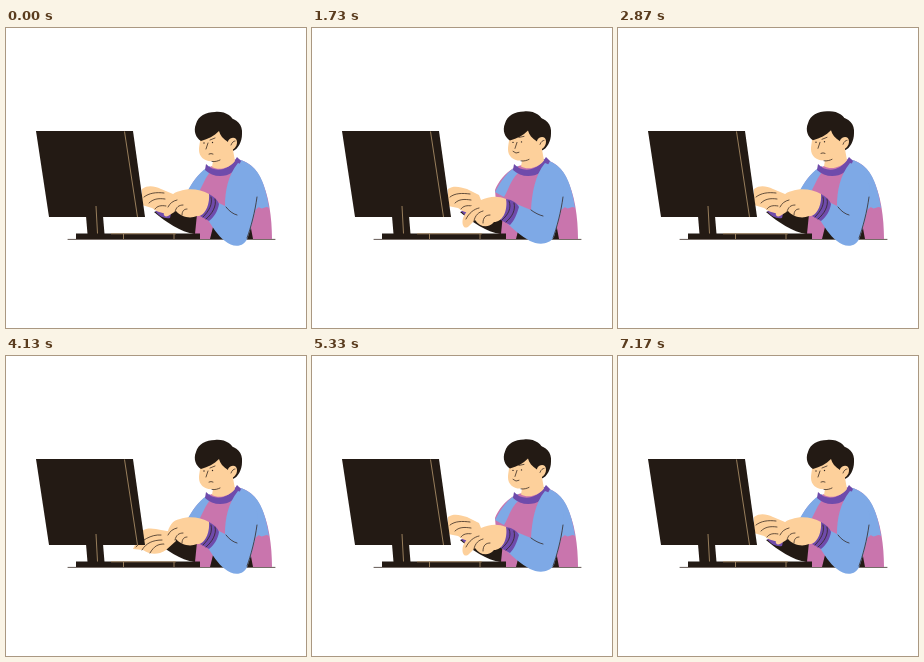
An HTML page for the animation above (7.21 s loop, 300x300 px).

```html
<!DOCTYPE html>
<html lang="en">
<head>
<meta charset="utf-8">
<title>Typing at the desk</title>
<style>
html, body { margin: 0; width: 100%; height: 100%; overflow: hidden; background: #fff; }
svg { display: block; width: 100%; height: 100%; }
.ink { fill: none; stroke: #30231d; stroke-width: .75; stroke-linecap: round; stroke-linejoin: round; }
.trim { fill: none; stroke: #a58a64; stroke-width: .9; }
.skin { fill: #fdd09b; }
.dark { fill: #231a14; }
.blue { fill: #7ea9e6; }
.pink { fill: #c975ad; }
.violet { fill: #6f4bab; }
</style>
</head>
<body>
<svg viewBox="0 0 300 300">
  <path class="ink" d="M62 211.4H269"/>
  <g id="body"></g>
  <path class="dark" d="M70 205.5H194V211H70Z"/>
  <path class="trim" d="M105 205.8H170M117.5 206V211M168 206V211"/>
  <g id="far"></g>
  <g id="head">
    <path class="dark" d="M221 90C231 90 237 97 236 106C236 114 232 121 227 123L219 112Z"/>
    <path class="skin" d="M194 105C195 112 193 117 193 122C193 129 199 134 207 133L206 139C213 143 224 140 229 133L227 122L226 104L204 98Z"/>
    <path class="dark" d="M195 113C190 110 187 103 190 96C192 88 200 84 209 84C219 83 227 88 229 96L229 109L222 114C217 111 214 107 213 103C208 108 202 111 195 113Z"/>
    <path class="skin" d="M222 113C225 108 231 109 231 114C231 119 227 123 223 122Z"/>
    <path class="ink" d="M225 117C226 114 228 113 229 113M206 133.5C209 134 212 133 214 132M202 115L200 121"/>
    <circle cx="198" cy="115" r=".7" fill="#30231d"/>
    <circle cx="206.5" cy="114.5" r=".7" fill="#30231d"/>
    <path class="ink" id="brow"/>
    <path class="ink" id="mouth"/>
  </g>
  <g id="near"></g>
  <g id="monitor">
    <path class="dark" d="M80 188H97L98.5 206H81.5Z"/>
    <path class="dark" d="M30 103H127L139 189H43Z"/>
    <path class="trim" d="M118.5 103.5L131.5 189M90 178L91.5 205.5"/>
  </g>
</svg>
<script>
const LOOP = 7210, CYCLE = LOOP / 2;
const byId = id => document.getElementById(id);

// [layer, class, resting, right hand pressing, left hand pressing]
const parts = [
  ["body", "pink", "M203 139C193 145 186 154 183 162L187 211H266C266 190 263 166 254 149C249 139 241 133 231 131Z"],
  ["body", "blue", "M231 131C246 134 254 145 258 158C261 167 262 174 263 180C259 177 257 183 253 179C250 181 248 184 245 182L226 160Z"],
  ["body", "blue", "M204 138C195 142 188 152 182 162L191 166C195 163 197 153 204 144Z",
                   "M206 138C196 142 189 153 183 164L192 169C196 163 198 153 206 145Z"],
  ["body", "dark", "M204 211L207 199L219 211ZM239 211L244 195L247 211Z"],
  ["body", "violet", "M200 136C207 144 222 145 231 129L235 133C229 150 209 152 199 142Z",
                     "M202 136C209 144 224 145 234 129L238 133C231 150 211 152 201 142Z"],
  ["far", "dark", "M148 184L164 180L191 186L189 206C174 204 160 194 148 184Z"],
  ["far", "violet", "M149 183L166 181L164 190C158 191 153 188 149 183Z"],
  ["far", "skin", "M136 161C142 157 148 158 155 161L167 166L172 176L164 184C157 187 150 183 146 180L136 177Z",
                  "M136 161C142 157 148 159 155 161L167 167L171 177L164 184C157 187 150 183 146 180L136 178Z",
                  "M136 175C142 171 149 173 155 174L167 176L170 185L160 194C151 200 143 198 137 194L127 193Z"],
  ["far", "ink", "M138 169C143 165 150 164 158 165M143 175C147 171 152 170 159 171M149 181C151 178 155 177 160 178",
                 "M138 169C143 165 150 165 158 166M143 175C147 171 152 171 159 172M149 181C151 178 155 177 160 178",
                 "M130 191C135 185 145 178 155 179M136 194C140 187 147 184 156 184M144 197C148 190 152 188 158 188"],
  ["near", "blue", "M232 135C246 139 253 155 252 167C250 183 246 197 242 209C238 220 227 220 219 213C211 207 207 199 202 192L209 173L219 178C219 163 222 147 232 135Z",
                   "M233 135C247 139 253 155 252 166C250 182 246 196 242 209C237 217 226 217 218 213C209 208 201 201 195 195L202 175L219 182C220 165 223 147 233 135Z"],
  ["near", "ink", "M251 169C249 184 245 199 241 210M220 179C223 183 227 186 231 187",
                  "M251 169C249 184 245 199 241 210M219 182C223 185 227 187 231 188"],
  ["near", "violet", "M203 166C209 169 212 173 213 176C212 183 208 189 203 193L194 188C200 181 203 175 203 166Z",
                     "M194 171C201 172 205 175 207 179C205 186 202 193 198 197L187 191C193 185 195 179 194 171Z"],
  ["near", "skin", "M203 166C195 161 182 160 174 163C166 164 163 171 161 178C156 184 157 190 162 188L170 183C175 189 184 191 191 188C198 189 204 178 203 166Z",
                   "M194 171C185 167 176 169 169 172C159 176 155 182 151 190C149 198 153 202 157 198L163 192C168 199 176 201 182 194C190 194 196 184 194 171Z"],
  ["near", "ink", "M162 179C164 175 167 173 171 172M169 184C170 179 173 177 177 177M176 187C176 183 178 181 181 181",
                  "M154 191C157 185 162 181 167 180M162 193C163 187 167 184 171 183M171 195C171 189 174 187 178 187"],
  ["near", "ink", "M205 169C207 176 203 183 197 189M209 171C211 178 206 186 200 191",
                  "M197 173C200 180 196 187 190 192M202 175C204 182 200 189 194 194"]
];

const numbers = /-?\d+(\.\d+)?/g;
function blend(a, b, t) {
  if (!t || a === b) return a;
  const end = b.match(numbers);
  let i = 0;
  return a.replace(numbers, n => (+n + (end[i++] - n) * t).toFixed(2));
}

// steps: [time, value], eased between neighbours
function track(steps, time) {
  const i = steps.findIndex(s => s[0] > time);
  if (i < 0) return steps[steps.length - 1][1];
  const [t0, v0] = steps[i - 1], [t1, v1] = steps[i];
  const u = (time - t0) / (t1 - t0);
  return v0 + (v1 - v0) * u * u * (3 - 2 * u);
}

// left press, right press, left press again, then rest
const lean = [[0, 0], [600, 0], [1000, 1], [1960, 1], [2360, 0], [CYCLE, 0]];
const reach = [[0, 0], [70, 0], [420, 1], [540, 1], [860, 0], [2100, 0], [2420, 1], [2540, 1], [2860, 0], [CYCLE, 0]];
const nod = [[0, 0], [2450, 0], [2900, -.7], [3150, -.7], [3540, 0], [CYCLE, 0]];

const shapes = parts.map(([layer, look, rest, right = rest, left = rest]) => {
  const el = document.createElementNS("http://www.w3.org/2000/svg", "path");
  el.setAttribute("class", look);
  byId(layer).append(el);
  return { el, rest, right, left };
});

function draw(now) {
  const time = now % CYCLE;
  const back = track(lean, time), out = track(reach, time), dip = track(nod, time);
  for (const s of shapes) {
    const pose = blend(s.rest, s.right, back);
    s.el.setAttribute("d", s.left === s.rest ? pose : blend(pose, s.left, out));
  }
  byId("head").setAttribute("transform", `translate(${back * 3} ${dip - back * .6})`);
  byId("brow").setAttribute("d", blend("M204 112L209 110", "M204 110L209 109", back));
  byId("mouth").setAttribute("d", blend("M203 126Q205 125 207 126", "M198 124Q201 127 204 125", back));
}

function frame() {
  draw(performance.now());
  requestAnimationFrame(frame);
}
frame();
</script>
</body>
</html>
```
